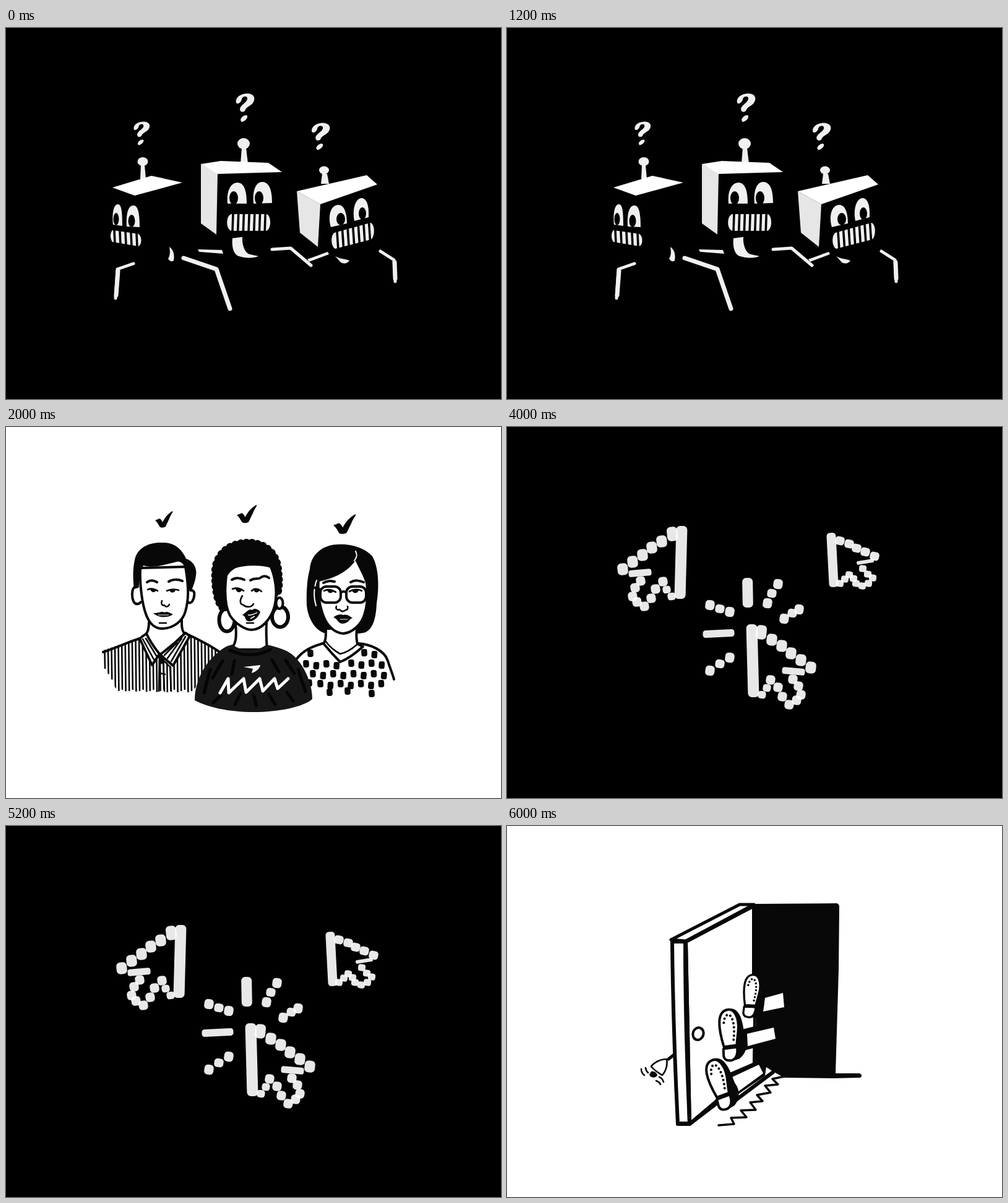
Recreate the animation shown at these times as an HTML page. Size 800 by 600 pixels, loop 8 s.

```html
<!DOCTYPE html>
<html lang="en">
<head>
<meta charset="utf-8">
<title>Robots, people, pointers, door</title>
<style>
html, body { margin: 0; width: 100%; height: 100%; overflow: hidden; background: #000; }
svg { display: block; width: 100vw; height: 100vh; }
.ink { fill: #080808; }
.paper { fill: #fff; }
.line { fill: none; stroke: #080808; stroke-width: 4; stroke-linecap: round; stroke-linejoin: round; }
.filled { fill: #fff; }
.thin { stroke-width: 2.6; }
.bold { stroke-width: 6; }
.chalk { fill: #f0f0f0; }
.arm { fill: none; stroke: #f0f0f0; stroke-width: 7; stroke-linejoin: round; stroke-linecap: round; }
.bars { fill: none; stroke: #000; stroke-width: 3.6; }
</style>
</head>
<body>
<svg viewBox="0 0 800 600">
<defs>
  <g id="ask">
    <path d="M372 121C370 110 383 105 392 106C401 107 404 114 399 121C396 126 388 127 386 134C383 137 378 136 378 131C379 124 389 121 390 115C391 109 382 110 381 115C380 121 374 124 372 121Z"/>
    <path d="M379 149C380 143 388 139 390 142C391 146 386 151 381 152Z"/>
  </g>
  <path id="tick" d="M0 15L7 12C10 13 11 16 12 18C16 10 21 4 28 0C30 1 26 4 23 12L17 25C14 27 11 27 8 26C5 22 4 18 0 15Z"/>
  <g id="shoe">
    <path class="ink" d="M4 -43C20 -40 22 -18 24 4C29 15 27 30 14 39L0 43L6 -20Z"/>
    <path class="line filled" d="M-2 -41C10 -43 16 -25 14 -8C13 3 11 10 11 17L-10 19C-13 8 -17 -8 -16 -22C-15 -34 -10 -40 -2 -41Z"/>
    <path class="line filled" d="M-11 22L11 20C13 30 9 39 2 41C-6 42 -10 40 -11 34Z"/>
    <path class="line" stroke-dasharray="0.1 6.6" d="M-9 -20C-8 -29 -4 -34 0 -33C8 -27 9 -8 5 14"/>
  </g>
  <clipPath id="shirt"><path d="M155 362L216 341L236 388L248 368L269 390L296 336L346 364L300 430L180 427L155 386Z"/></clipPath>
</defs>

<g class="scene">
  <rect width="800" height="600"/>
  <g class="chalk">
    <use href="#ask"/>
    <use href="#ask" transform="translate(-117 63.500) scale(.87 .83)"/>
    <use href="#ask" transform="translate(126 53) scale(.99 .95)"/>
    <ellipse cx="384" cy="187" rx="10" ry="9"/>
    <path d="M381 194H388L391 219H379Z"/>
    <ellipse cx="221" cy="216" rx="8.500" ry="7"/>
    <path d="M218 222H224L226 244H217Z"/>
    <ellipse cx="514" cy="230" rx="8" ry="6.500"/>
    <path d="M511 236H519L522 252H509Z"/>
    <path fill="#e6e6e6" d="M315 220L342 235L340 334L315 316Z"/>
    <path class="paper" d="M315 220L347 215L424 218L446 233L342 236Z"/>
    <path class="paper" d="M172 258L235 239L285 250L208 271Z"/>
    <path fill="#e6e6e6" d="M470 264L508 285L504 354L475 331Z"/>
    <path class="paper" d="M470 264L583 238L600 253L508 285Z"/>
    <path d="M358 284C356 262 364 250 374 250C386 250 389 266 389 284ZM400 284C398 262 404 249 414 249C427 249 430 266 430 283Z"/>
    <path d="M173 318C171 296 175 285 181 285C187 285 188 300 188 320ZM195 321C194 298 198 287 206 287C214 287 216 302 216 322Z"/>
    <path d="M525 322C519 300 527 286 537 286C547 286 551 300 551 316ZM563 312C559 290 566 275 575 275C584 276 587 290 586 306Z"/>
    <path d="M364 301H421C429 303 429 325 421 328H364C355 325 355 304 364 301Z"/>
    <path d="M172 327L214 333C220 337 220 350 214 353L172 346C168 341 168 331 172 327Z"/>
    <path d="M531 331L589 315C596 317 597 336 590 342L532 357C525 354 524 335 531 331Z"/>
    <path d="M366 340L382 338C381 350 386 364 394 366L408 369C400 373 385 372 376 369C366 365 365 350 366 340Z"/>
    <path d="M264 354C270 358 273 366 271 376C268 379 264 377 262 373C266 367 265 360 264 354Z"/>
    <path d="M532 369C538 373 546 373 555 376C552 381 546 382 541 379Z"/>
    <path d="M310 358L349 359L351 365L312 362Z"/>
    <path d="M487 374L520 362L522 366L490 378Z"/>
  </g>
  <g>
    <ellipse cx="368" cy="275" rx="7" ry="11"/><ellipse cx="409" cy="275" rx="7" ry="11"/>
    <ellipse cx="178" cy="309" rx="4.500" ry="10"/><ellipse cx="203" cy="312" rx="5.500" ry="10"/>
    <ellipse cx="541" cy="309" rx="7" ry="10"/><ellipse cx="576" cy="300" rx="6" ry="10"/>
  </g>
  <path id="teeth" class="bars"/>
  <path class="arm" stroke-width="6" d="M287 372L340 390L362 454"/>
  <path class="arm" style="stroke-width:5" d="M430 358L460 356L493 384M206 381L180 390L177 437M605 361L627 375L629 410"/>
  <path class="arm" d="M181 393L178 432M628 379L629 405"/>
</g>

<g class="scene">
  <rect class="paper" width="800" height="600"/>
  <g class="ink">
    <use href="#tick" x="241" y="136"/>
    <use href="#tick" transform="translate(373 126) scale(1.13 1.1)"/>
    <use href="#tick" transform="translate(529 141) scale(1.27 1.2)"/>
  </g>

  <g id="man">
    <path id="stripes" class="line thin" clip-path="url(#shirt)"/>
    <path class="line" d="M157 364C180 356 200 347 216 342M295 336C315 346 332 354 345 364"/>
    <path class="line" d="M231 316C231 325 229 331 227 334M284 312C284 322 284 327 287 332"/>
    <path class="line filled" d="M227 334L216 342L236 385L248 367C240 357 232 346 227 334ZM290 333L297 338L270 386L249 368C264 357 277 346 290 333Z"/>
    <path class="line thin" d="M221 343L239 376M226 342L243 370M290 339L267 379M284 342L261 374M276 349L256 369"/>
    <path class="line thin" d="M237 385L248 368L247 427M249 372L263 386M254 376L256 427M265 387L267 427M248 398L257 400"/>
    <path class="ink" d="M247 369L256 376L252 384L247 380Z"/>
    <path class="line filled" d="M213 258C202 255 203 275 206 282C209 288 215 287 218 283M298 264C307 263 305 275 301 282C299 285 296 285 294 283"/>
    <path class="line filled" d="M217 228C216 250 219 285 227 305C233 320 243 327 254 326C272 325 286 313 290 298C295 280 296 262 290 226Z"/>
    <path class="ink" d="M207 262C204 240 206 222 209 211C214 195 232 186 252 187C270 186 284 196 291 213C303 217 309 228 307 240C306 250 302 258 299 267L295 262C296 250 291 238 288 226C286 219 280 217 276 218C258 222 240 229 222 224C217 232 217 245 214 260Z"/>
    <path class="line" d="M228 251C233 247 239 248 244 251M263 250C269 246 278 246 285 249"/>
    <path class="line thin" d="M229 263C235 260 240 262 245 265M260 265C266 262 273 262 279 264M252 281C250 286 253 290 256 288C258 292 262 291 264 287M248 317H259"/>
    <path class="ink" d="M233 263H243C242 268 236 269 233 263ZM264 264H274C272 269 266 269 264 264Z"/>
    <path class="ink" d="M238 301C247 301 252 297 256 300C261 297 265 301 270 303C262 309 246 309 238 301Z"/>
    <path stroke="#fff" d="M246 304L263 304"/>
  </g>

  <g id="woman">
    <path class="ink" d="M520 335C500 331 488 310 486 288C485 260 488 240 491 230C492 208 510 191 535 190C555 188 580 195 592 209C603 228 603 260 599 285C598 310 593 326 581 332C570 335 562 335 550 331Z"/>
    <path class="line filled" d="M517 326C517 338 517 346 513 350C522 361 532 372 540 380C553 375 567 364 577 355L568 351C566 343 566 335 567 326Z"/>
    <path class="line filled" d="M505 248C530 243 552 233 565 212C572 228 580 240 583 252C586 275 583 300 574 315C566 326 556 333 545 334C530 333 517 320 511 300C506 285 504 265 505 248Z"/>
    <path fill="none" stroke="#fff" stroke-width="2" stroke-linecap="round" d="M565 201C568 207 567 211 563 216M502 248C497 262 497 276 501 289"/>
    <path class="line" d="M512 350C495 355 480 361 469 376M568 350C590 351 612 362 617 378C621 391 625 400 627 408"/>
    <path class="line thin" d="M517 347C524 357 533 363 540 367C549 365 558 360 567 352"/>
    <g id="dabs" class="ink"></g>
    <rect class="line" x="508" y="258" width="33" height="26" rx="10"/>
    <rect class="line" x="550" y="258" width="32" height="26" rx="10"/>
    <path class="line" d="M541 268Q546 264 550 268M499 260L508 263M582 263L588 261"/>
    <path class="line" d="M513 252C520 248 525 249 531 250M557 251C564 247 570 248 578 251"/>
    <path class="line thin" d="M514 265C521 261 527 264 533 267M555 266C562 262 569 262 575 265M534 290C532 294 536 297 539 295C543 300 546 298 549 296C552 296 553 293 552 290"/>
    <path class="ink" d="M519 264H529C528 270 521 270 519 264ZM559 264H570C568 270 561 270 559 264ZM529 308C536 302 542 303 545 304C550 302 556 306 560 309C554 310 555 317 545 318C535 318 537 310 529 308Z"/>
    <path stroke="#fff" d="M540 311H552"/>
  </g>

  <g id="singer">
    <ellipse class="line bold" cx="357" cy="312" rx="12.500" ry="18.500"/>
    <ellipse class="line bold" cx="443" cy="307" rx="13" ry="16.500"/>
    <path class="ink" d="M354 298C341 288 336 262 337 235C338 205 357 186 392 186C424 186 441 205 443 235C444 255 443 264 439 274L424 280Z"/>
    <path class="line" stroke-dasharray="0.1 9" style="stroke-width:13" d="M350 292C341 282 338 262 338 235C339 207 358 188 392 187C422 188 439 207 440 235C442 250 441 260 439 268"/>
    <ellipse class="line filled" cx="442" cy="285" rx="5.500" ry="9"/>
    <path class="line filled" d="M371 318C373 340 372 352 362 360H422C421 348 420 335 421 316Z"/>
    <path class="line filled" d="M356 240C353 265 354 290 362 305C372 320 388 328 397 328C412 328 428 312 434 290C438 275 438 250 428 226C415 221 385 221 369 227C362 231 358 236 356 240Z"/>
    <path class="line" d="M365 247C371 243 379 244 385 247M395 248C403 243 407 247 411 244C416 240 421 241 425 244"/>
    <path class="line thin" d="M366 262C373 259 380 262 384 265M397 265C402 260 408 262 413 266M382 273C377 281 378 287 384 288C388 292 397 292 400 286M389 317H400"/>
    <path class="ink" d="M371 262H382C380 269 373 269 371 262ZM400 263H410C408 269 402 269 400 263Z"/>
    <path class="ink" d="M382 304C389 299 393 293 398 296C402 292 408 295 411 299C408 308 399 316 391 314C385 312 389 307 382 304Z"/>
    <path fill="none" stroke="#fff" stroke-width="1.500" d="M391 304C397 305 402 302 406 300M395 310L402 306"/>
    <path fill="#171717" d="M305 442C305 415 318 385 341 366C347 360 357 353 366 352C382 364 405 364 421 352C440 356 458 362 467 372C483 388 495 415 495 440C480 453 440 461 400 461C360 461 325 453 305 442Z"/>
    <path fill="none" stroke="#050505" stroke-width="5" stroke-linecap="round" d="M362 361C382 371 407 371 427 360M330 392L320 430M350 378L334 406M369 378L365 400M430 377L441 396M452 377L466 399M472 392L484 428M335 446L347 434M370 449L379 431M405 451L400 432M435 449L425 432M464 443L454 429"/>
    <path fill="none" stroke="#fff" stroke-width="5" stroke-linecap="round" stroke-linejoin="round" d="M346 430L359 407L360 430L384 407L388 429L410 407L415 427L434 407L439 423L456 407"/>
    <path class="paper" d="M384 388L411 385C410 391 404 396 397 398L399 391Z"/>
  </g>
</g>

<g class="scene">
  <rect width="800" height="600"/>
  <g id="pointers" fill="#fff" fill-opacity=".91"></g>
</g>

<g class="scene">
  <rect class="paper" width="800" height="600"/>
  <path class="ink" d="M396 126L533 125Q537 126 537 131L536 232L531 400H570Q576 403 571 407L528 408L448 407L430 397L397 376Z"/>
  <path class="line bold filled" d="M289 187L399 129L400 393L295 482Z"/>
  <path class="paper" d="M396 240L403 312L403 325L397 378L392 396L378 400Z"/>
  <path class="ink" d="M396 128H401V244H396ZM398 308L403 306L402 382L397 379Z"/>
  <path class="line bold filled" d="M267 187H289L295 481H276C272 400 268 290 267 187Z"/>
  <path class="line" style="stroke-width:5" d="M265 184L376 127H399L289 186Z" fill="#fff"/>
  <path class="line bold" d="M288 190C288 290 291 390 295 480M276 482H295L342 446"/>
  <ellipse class="line filled" cx="309" cy="336" rx="8.500" ry="10" transform="rotate(18 309 336)"/>

  <path class="line" style="stroke-width:5" d="M271 369L261 377"/>
  <path class="line thin filled" d="M258 377C247 377 237 383 233 389C239 396 246 400 251 403C256 397 260 388 258 377Z"/>
  <path class="ink" d="M233 397C238 396 242 399 243 403C240 409 231 407 230 402Z"/>
  <path class="line thin" d="M217 393C217 398 219 401 222 403M224 391C224 395 226 397 228 399M241 412C244 413 247 415 248 418M246 406C250 407 252 411 253 414"/>

  <path class="line" style="stroke-width:3.500" d="M342 484L367 482L362 472L387 471L378 460L402 459L393 447L413 445L404 435L426 431L417 420L438 418L429 409L448 405"/>
  <path class="line bold" d="M370 443L430 398"/>

  <path class="ink" d="M410 270L446 262Q457 264 456 276L453 294L408 308Z"/>
  <path class="paper" d="M417 278L446 270L448 293L414 300Z"/>
  <path class="ink" d="M380 329L428 317Q438 318 438 330L436 349L380 364Z"/>
  <path class="paper" d="M388 336L431 326L434 344L389 356Z"/>
  <path class="ink" d="M360 399L404 380Q413 377 419 389L417 404L369 437Z"/>
  <path class="paper" d="M364 406L407 386L414 400L373 430Z"/>
  <use href="#shoe" transform="translate(395 275) rotate(8) scale(.84)"/>
  <use href="#shoe" transform="translate(360 338) rotate(-2)"/>
  <use href="#shoe" transform="translate(344 418) rotate(-15)"/>
</g>
</svg>

<script>
const HOLD = 2000;
const NS = "http://www.w3.org/2000/svg";
const byId = id => document.getElementById(id);
const scenes = [...document.querySelectorAll(".scene")];

function dab(parent, x, y, w, h, turn = 0) {
  const r = document.createElementNS(NS, "rect");
  const attrs = {
    x: x - w / 2, y: y - h / 2, width: w, height: h, rx: Math.min(w, h) * 0.36,
    transform: `rotate(${turn} ${x} ${y})`
  };
  for (const key in attrs) r.setAttribute(key, attrs[key]);
  parent.append(r);
}

// Gaps between teeth: first x, y, count, step, slope, lean, height
function gaps(x, y, n, step, slope, lean, h) {
  let d = "";
  for (let i = 0; i < n; i++) {
    d += `M${x + i * step} ${y + i * step * slope}l${lean} ${h}`;
  }
  return d;
}

function drawTeeth() {
  byId("teeth").setAttribute("d",
    gaps(367, 300, 7, 8.7, 0, -1, 29) +
    gaps(175, 327, 5, 9, 0.14, 1, 22) +
    gaps(535, 329, 7, 8.6, -0.27, 2, 30));
}

function drawStripes() {
  let d = "";
  for (let x = 159, i = 0; x < 345; x += 5.6, i++) {
    const end = Math.min(428, 388 + (x - 158) * 1.9) - (i % 3) * 2;
    d += `M${x} 336L${x + 1} ${end}`;
  }
  byId("stripes").setAttribute("d", d);
}

function drawDabs() {
  const rows = [
    [492, 366, 1], [579, 365, 2], [485, 383, 4], [558, 382, 4],
    [496, 399, 8], [490, 414, 1], [508, 415, 7], [523, 429, 1], [552, 427, 1], [591, 431, 1]
  ];
  for (const [x, y, n] of rows) {
    for (let i = 0; i < n; i++) {
      dab(byId("dabs"), x + i * 16.4, y + (i % 2) * 3, 9.5, 12, i % 2 ? 4 : -3);
    }
  }
}

const slope = [[411, 332], [428, 344], [444, 354], [459, 366], [475, 377], [491, 389]];
const tail = [[462, 408], [471, 419], [475, 433], [468, 442], [456, 449],
  [445, 436], [438, 421], [426, 409], [420, 422], [412, 433]];

function drawPointer(flip, dx, dy) {
  const parent = byId("pointers");
  const put = (x, y, w, h, turn = 0) => dab(parent, flip * x + dx, y + dy, w, h, flip * turn);
  put(397, 378, 18, 118, -1.5);
  slope.forEach(([x, y], i) => put(x, y, 17, i ? 19 : 23, 6));
  put(463, 395, 37, 11, 5);
  tail.forEach(([x, y], i) => put(x, y, i > 7 ? 13 : 15, i > 7 ? 12 : 15, 8));
}

function drawSmallPointer() {
  const parent = byId("pointers");
  dab(parent, 526, 215, 15, 88, -3);
  [[538, 184], [553, 189], [565, 196], [579, 202], [594, 209]]
    .forEach(([x, y]) => dab(parent, x, y, 15, 14, 12));
  dab(parent, 579, 218, 28, 6, -9);
  [[575, 229], [583, 238], [591, 244], [584, 253], [574, 257], [564, 253],
    [560, 245], [553, 239], [546, 246], [538, 253]]
    .forEach(([x, y]) => dab(parent, x, y, 12, 11, 5));
}

function drawRays() {
  const parent = byId("pointers");
  dab(parent, 389, 268, 17, 48, -1);
  dab(parent, 342, 334, 51, 12, -3);
  const rays = [[438, 254, 428, 269, 421, 285], [472, 295, 461, 301, 448, 310],
    [328, 288, 344, 294, 360, 299], [360, 373, 344, 383, 328, 394]];
  for (const ray of rays) {
    for (let i = 0; i < 6; i += 2) dab(parent, ray[i], ray[i + 1], 15, i === 2 ? 14 : 16, 8);
  }
}

function render(ms) {
  const step = Math.floor(ms / HOLD) % scenes.length;
  scenes.forEach((s, i) => { s.style.display = i === step ? "" : "none"; });
}

drawTeeth();
drawStripes();
drawDabs();
drawPointer(1, 0, 0);
drawPointer(-1, 678, -159);
drawSmallPointer();
drawRays();

const start = performance.now();
function tick() {
  render(performance.now() - start);
  requestAnimationFrame(tick);
}
tick();
</script>
</body>
</html>
```
